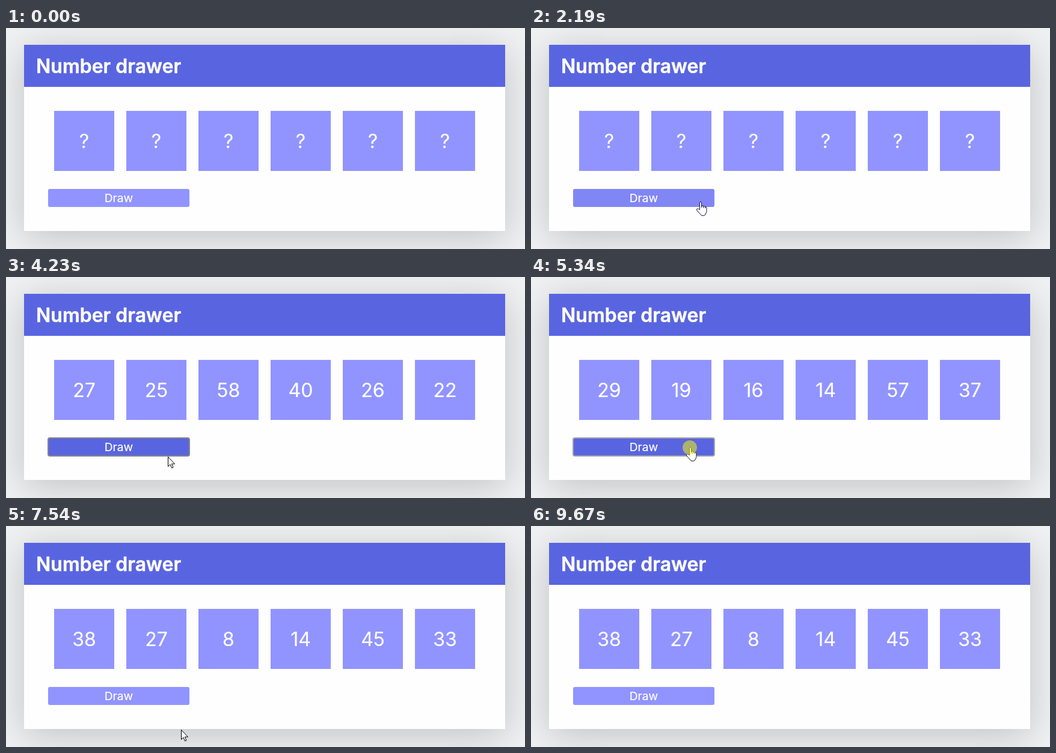
An HTML page that plays this animation: 863x368 px, repeating every 9820 ms.

```html
<!DOCTYPE html>
<html lang="en">
<head>
<meta charset="utf-8">
<title>Number drawer</title>
<style>
  html, body { margin: 0; width: 100%; height: 100%; overflow: hidden; background: #eff1f2; }
  .panel {
    position: absolute; left: 30px; top: 28px; width: 800px; height: 310px;
    background: #fefefe; box-shadow: 0 10px 60px rgba(0, 0, 0, .2);
  }
  svg { position: absolute; left: 0; top: 0; display: block; }
  text { font-family: Inter, sans-serif; fill: #fff; stroke: #fff; stroke-width: .2px; }
  .title { font-size: 32px; font-weight: 600; stroke-width: .5px; }
  .num { font-size: 32px; text-anchor: middle; }
  .label { font-size: 19.2px; text-anchor: middle; }
</style>
</head>
<body>
<div class="panel"></div>
<svg width="863" height="368" viewBox="0 0 863 368">
  <rect x="30" y="28" width="800" height="70" fill="#5965e0"/>
  <text class="title" x="50" y="75">Number drawer</text>
  <g id="tiles"></g>
  <rect id="button" x="70" y="268" width="235" height="30" rx="3" stroke-width="2"/>
  <text class="label" x="187.5" y="290">Draw</text>
  <g id="cursor">
    <path id="arrow" fill="#fff" stroke="#000" d="M.5 .5V16.5L4 13.2L6.6 19L9 18L6.5 12.2H11.5Z"/>
    <path id="hand" transform="translate(-1 -1)" fill="#fff" stroke="#15153a" d="M.5 13.5V2Q.5 .5 2 .5T3.5 2V10V7.5Q5 6.3 6.5 7.5V10.5V8.2Q8 7 9.5 8.5V11V9Q11.5 8 12 10V15.5Q12 18 10.5 20Q10 23.5 6 23.5Q2.5 23.5 1.5 21L-4 15Q-5.5 12.5 -3.5 11.8Q-1.5 11.8 .5 13.5Z"/>
    <circle id="spot" r="12" fill="#ff0" fill-opacity=".5"/>
  </g>
</svg>
<script>
const LOOP = 9820, START = 755, TICK = 78.85;
const NORMAL = '#9194ff', HOVER = '#8186f5', ACTIVE = '#5965e0';
const ENTER = { x: 716, y: 356 };
const EXIT = { start: 89, ticks: 13, x: 797, y: 365 };

// Each visit to the button, in ticks: approach, press, stay, then leave for a rest point
const visits = [
  { start: 10, press: 21, stay: 4, spot: [281, 290], rest: [274, 313] },
  { start: 31, press: 42, stay: 1, spot: [270, 285], rest: [268, 325] },
  { start: 50, press: 57, stay: 2, spot: [264, 284], rest: [264, 325] },
  { start: 65, press: 79, stay: 3, spot: [270, 286], rest: [292, 341] }
];
const draws = [
  '? ? ? ? ? ?', '27 25 58 40 26 22', '29 19 16 14 57 37',
  '41 9 52 31 18 43', '38 27 8 14 45 33'
].map(row => row.split(' '));

// Glides: start tick, duration, destination
const glides = [
  [0, 9, 372, 294],
  ...visits.flatMap(v => [
    [v.start, 7, ...v.spot],
    [v.press + v.stay, 5, ...v.rest]
  ]),
  [EXIT.start, EXIT.ticks, EXIT.x, EXIT.y]
];

const $ = id => document.getElementById(id);
const [tiles, button, cursor, arrow, hand, spot] =
  ['tiles', 'button', 'cursor', 'arrow', 'hand', 'spot'].map($);
const show = (el, on) => el.setAttribute('visibility', on ? 'visible' : 'hidden');
const progress = (tick, start, ticks) => Math.max(0, Math.min(1, (tick - start) / ticks));
const easeOut = u => u * (2 - u);

tiles.innerHTML = draws[0].map((_, i) => {
  const x = 80 + i * 120;
  return `<rect x="${x}" y="138" width="100" height="100" fill="${NORMAL}"/>
    <text class="num" x="${x + 50}" y="200"></text>`;
}).join('');
const digits = [...tiles.querySelectorAll('text')];

function pointerAt(tick) {
  let { x, y } = ENTER;
  for (const [start, ticks, toX, toY] of glides) {
    const e = easeOut(progress(tick, start, ticks));
    x += (toX - x) * e;
    y += (toY - y) * e;
  }
  // The way out bows upwards
  y -= 20 * Math.sin(Math.PI * easeOut(progress(tick, EXIT.start, EXIT.ticks)));
  return [Math.round(x), Math.round(y)];
}

function render(tick) {
  const visible = tick >= 0 && tick <= EXIT.start + EXIT.ticks;
  const [x, y] = pointerAt(tick);
  const over = visible && x >= 70 && x < 305 && y >= 268 && y < 298;
  const within = (a, b) => visits.some(v => tick >= v.press + a && tick <= v.press + b);
  const active = within(1, 2);

  cursor.setAttribute('transform', `translate(${x} ${y})`);
  show(arrow, visible && !over);
  show(hand, over);
  show(spot, within(0, 1));

  button.setAttribute('fill', active ? ACTIVE : over ? HOVER : NORMAL);
  button.setAttribute('stroke', !active ? 'none' : within(1, 1) ? '#a5a5a5' : '#868686');

  const row = draws[visits.filter(v => tick >= v.press + 3).length];
  digits.forEach((el, i) => { el.textContent = row[i]; });
}

let last = null;
function loop() {
  const tick = Math.floor((performance.now() % LOOP - START) / TICK);
  if (tick !== last) render(last = tick);
  requestAnimationFrame(loop);
}
loop();
</script>
</body>
</html>
```
